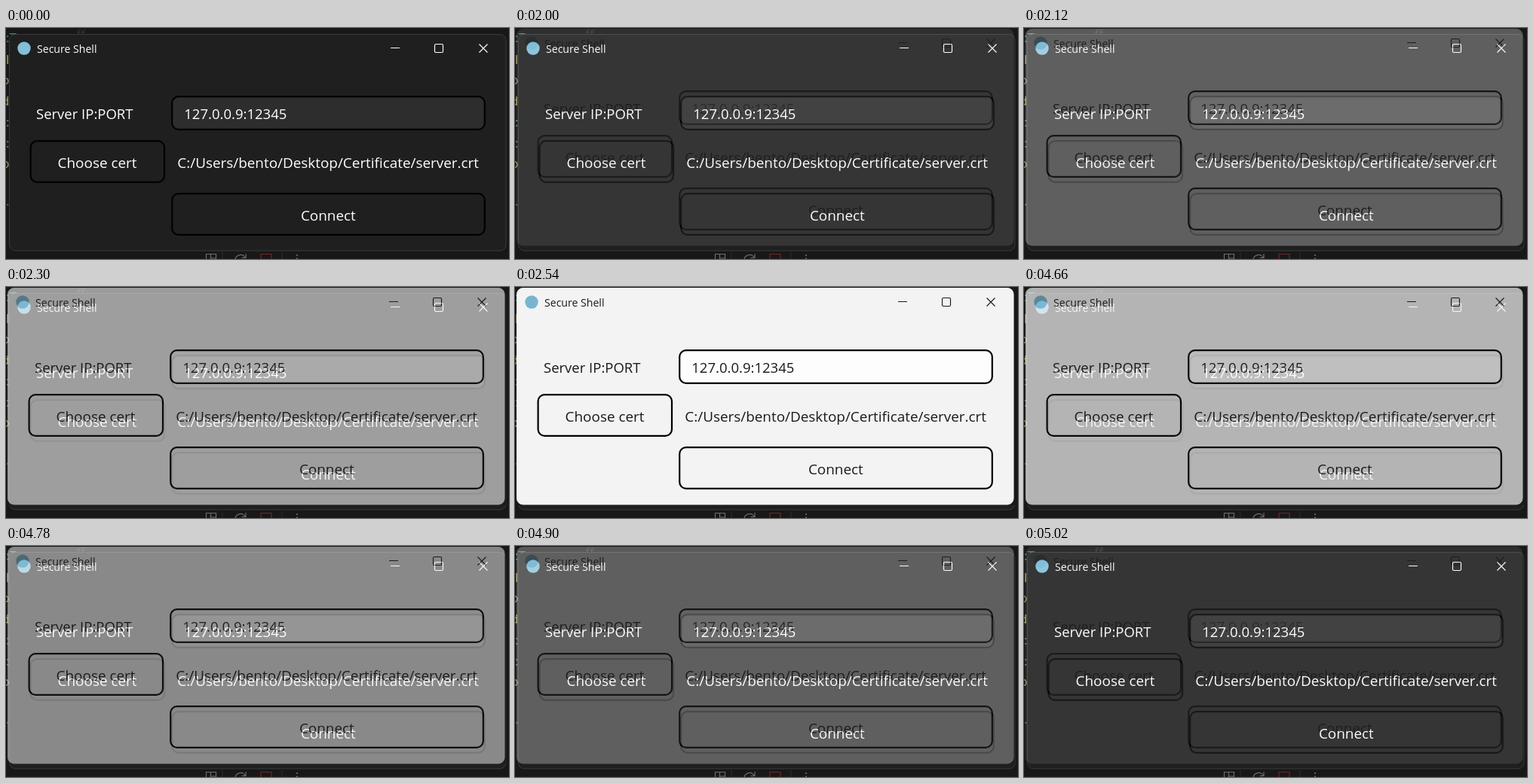
An HTML page that plays this animation: 667 by 307 pixels, repeating every 5.08 s.

```html
<!DOCTYPE html>
<html lang="en">
<head>
<meta charset="utf-8">
<title>Theme fade</title>
<style>
  html, body { margin: 0; height: 100%; overflow: hidden; background: #181818; }
  svg { display: block; }
  text { font: 18.9px "Open Sans", "Noto Sans", sans-serif; }
  .small { font-size: 14.1px; }
  .tight { font-size: 18.5px; }
  .mid { text-anchor: middle; }
  .code { font: 17px "Noto Sans", sans-serif; text-anchor: end; }
</style>
</head>
<body>
<svg id="stage" width="667" height="307" viewBox="0 0 667 307"></svg>
<script>
const stage = document.getElementById('stage');

const label = (x, y, text, cls = '') => `<text x="${x}" y="${y}" class="${cls}">${text}</text>`;

const box = (x, y, w, h, fill = 'none') =>
  `<rect x="${x}" y="${y}" width="${w}" height="${h}" rx="8.5" fill="${fill}" stroke="#000" stroke-width="2.2"/>`;

// Slivers of the editor behind the window
const slivers = [
  [48, 'l', '#a8a060'], [75, 'o', '#8f8a62'], [103, 'd', '#a59a58'], [131, ':', '#4f8f8a'],
  [159, ':', '#4f8f7c'], [186, 'o', '#9a8a60'], [236, '.', '#666']
];

const editor = `
  <rect width="667" height="307" fill="#181818"/>
  ${slivers.map(([y, c, fill]) => `<text class="code" x="4.5" y="${y}" fill="${fill}">${c}</text>`).join('')}
  <text class="code" x="14" y="19" fill="#3a8c7c">:T</text>
  <text class="code" x="105" y="14" fill="#333">ff</text>`;

const toolbar = `
  <g fill="none" stroke="#6c6c6c" stroke-width="1.2">
    <path d="M265.500 310V300.500H278.500V310M271.500 300.500V310M271.500 306H278.500"/>
    <path d="M304 309A7 7 0 0 1 317 305M318 300V305.500H312.500"/>
    <path d="M338 310V300.500H352V310" stroke="#702828"/>
    <path d="M287 298V307M366 298V307" stroke="#2b2b2b"/>
  </g>
  <circle cx="386" cy="302" r="1" fill="#777"/><circle cx="386" cy="306.500" r="1" fill="#777"/>`;

const panel = ({ bg, edge, field, ink, icon }) => `
  <rect x="4.5" y="8.500" width="658.500" height="287.500" rx="8" fill="${bg}" stroke="${edge}"/>
  <circle cx="24" cy="27" r="8.700" fill="${icon}"/>
  <g fill="none" stroke="${ink}" stroke-width="1.15">
    <path d="M510 26.500H522" stroke-width="1"/>
    <path d="M627.500 21.500L638.500 32.500M638.500 21.500L627.500 32.500"/>
    <rect x="568.500" y="21.500" width="11" height="11" rx="1.5"/>
  </g>
  ${box(220.200, 91.200, 414.600, 43.600, field)}
  ${box(32.600, 150.200, 177.400, 54.600)}
  ${box(220.200, 220.200, 414.600, 54.600)}
  <g fill="${ink}">
    ${label(41, 33, 'Secure Shell', 'small')}
    ${label(40, 120.500, 'Server IP:PORT', 'tight')}
    ${label(236.300, 120.500, '127.0.0.9:12345', 'tight')}
    ${label(121, 185.700, 'Choose cert', 'mid')}
    ${label(227.300, 185.700, 'C:/Users/bento/Desktop/Certificate/server.crt')}
    ${label(427.300, 255.500, 'Connect', 'mid')}
  </g>`;

const dark = { bg: '#1f1f1f', edge: '#3b3b3b', field: '#2d2d2d', ink: '#fff', icon: '#84bfda' };
const light = { bg: '#f3f3f3', edge: '#f3f3f3', field: '#fdfdfd', ink: '#1a1a1a', icon: '#78b4d0' };

// The light window sits slightly higher; nothing below y = 290 changes.
stage.innerHTML = `
  <clipPath id="upper"><rect width="664" height="290"/></clipPath>
  ${editor}${panel(dark)}${toolbar}
  <g id="day" clip-path="url(#upper)">${editor}<g transform="translate(-2 -7)">${panel(light)}</g></g>`;

const day = document.getElementById('day');
const HOLD = 2000, STEP = 60, FADE = 9 * STEP, HALF = HOLD + FADE;

function draw() {
  const t = performance.now() % (2 * HALF);
  const local = t % HALF;
  const mix = local < HOLD ? 0 : (Math.floor((local - HOLD) / STEP) + 1) / 10;
  day.setAttribute('opacity', t < HALF ? mix : 1 - mix);
  requestAnimationFrame(draw);
}
draw();
</script>
</body>
</html>
```
